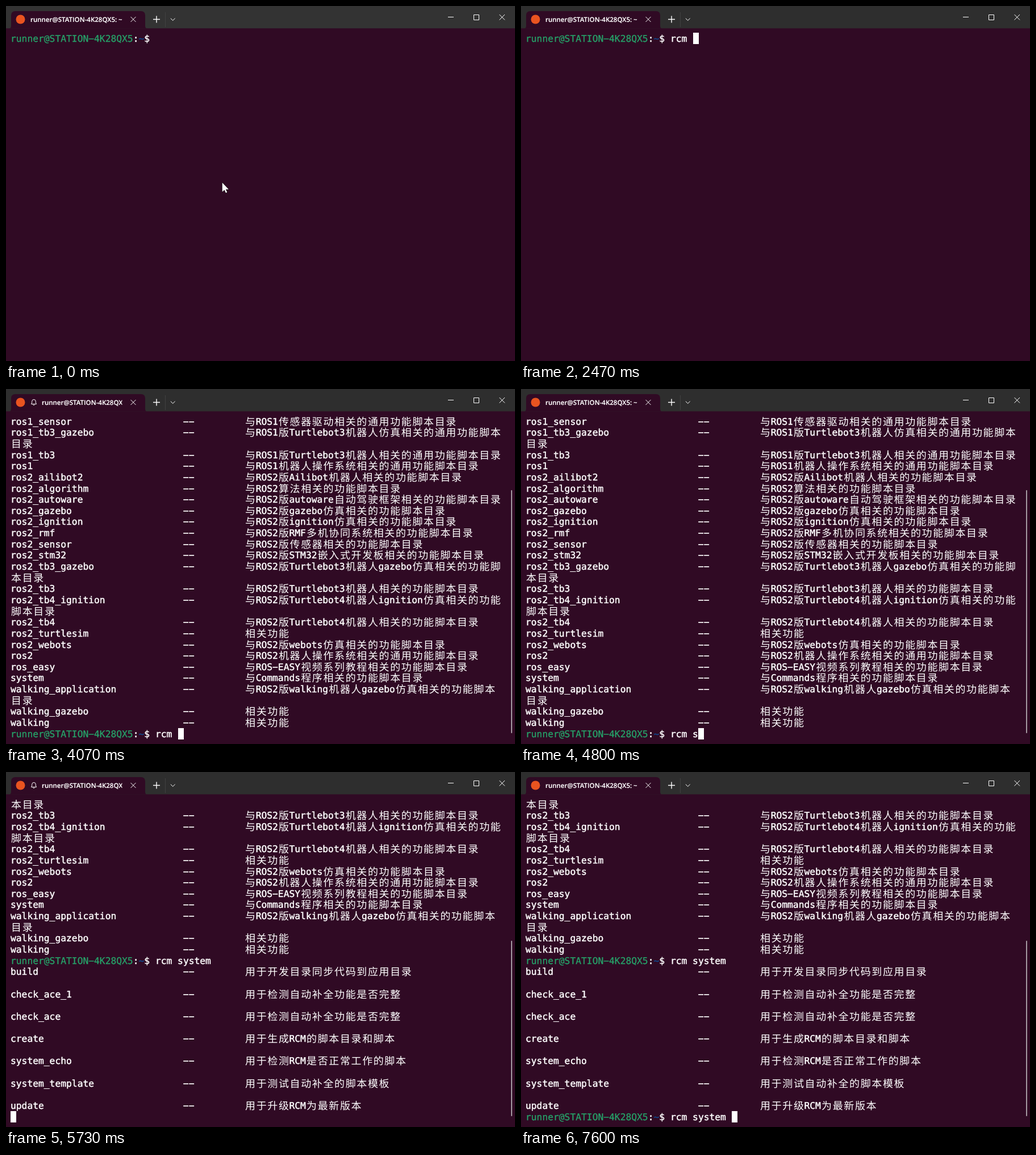
Recreate the animation shown at these times as an HTML page. Size 896x625 px, loop 8 s.

```html
<!DOCTYPE html>
<html lang="zh">
<head>
<meta charset="utf-8">
<title>Terminal</title>
<style>
  html, body { margin: 0; width: 100%; height: 100%; overflow: hidden; background: #300a24; }
  svg { display: block; width: 896px; height: 625px; }
  text { white-space: pre; text-rendering: geometricPrecision; }
  .mono { font: 16.3px "DejaVu Sans Mono", monospace; color: #fff; }
  .mono, .mono tspan { fill: currentColor; stroke: currentColor; stroke-width: .45px; }
  .mono .host { color: #26a269; stroke-width: .3px; }
  .mono .path { color: #12488b; }
  .cjk { font: 18px "Noto Sans CJK SC", "Noto Sans CJK", sans-serif; fill: #fff; }
  .title { font: 600 11.5px "Open Sans", "Noto Sans", sans-serif; fill: #fff; stroke: #fff; stroke-width: .2px; }
  .line { fill: none; stroke: #fff; stroke-width: 1; }
</style>
</head>
<body>
<svg viewBox="0 0 896 625">
  <clipPath id="tabClip"><rect x="40" y="10" width="164.5" height="28"/></clipPath>
  <rect width="896" height="625" fill="#300a24"/>
  <rect id="titleBar" width="896" height="39.3"/>
  <path fill="#300a24" d="M5 39.5Q9 39.5 9 35V16.5Q9 9 16.5 9H237.5Q245 9 245 16.5V35Q245 39.5 249 39.5Z"/>
  <circle cx="25.5" cy="23.5" r="8" fill="#e95420"/>
  <g id="bell" class="line">
    <path d="M44.5 26.5H53.5L52.3 24V21.8A3.3 3.3 0 0 0 45.7 21.8V24Z" stroke-linejoin="round"/>
    <path d="M47.5 27.5A1.6 1.6 0 0 0 50.5 27.5"/>
  </g>
  <g clip-path="url(#tabClip)"><text id="title" class="title" y="28"></text></g>
  <g class="line">
    <path d="M219.5 19L228.5 28M228.5 19L219.5 28"/>
    <path d="M259 23.5H271M265 17.5V29.5" stroke-width="1.4"/>
    <path d="M289.8 21.7L293.7 25.5L297.6 21.7"/>
    <path d="M778 19.5H788M823.5 15.5H832.5V24.5H823.5ZM868.5 15L878 24.5M878 15L868.5 24.5"/>
  </g>
  <path d="M280.5 11V37" stroke="#414141"/>
  <g id="screen"></g>
  <rect id="scrollbar" x="889" width="2" rx="1" fill="#a59aa2"/>
  <rect id="caret" width="10" height="20" fill="#fff"/>
  <path id="pointer" d="M0 0V16.2L3.8 12.7L6.2 18L8.6 17L6.2 11.7H11.2Z" fill="#fff" stroke="#000" paint-order="stroke"/>
</svg>
<script>
const LOOP = 8000, TICK = 1000 / 15;
const FOCUS = 470;
const LEFT = 8, TOP = 47.2, CELL_W = 9.81, CELL_H = 19.64, COLS = 88, LAST_ROW = 28;
const HOST = "runner@STATION-4K28QX5";
const PROMPT_COLS = HOST.length + 4;
const $ = id => document.getElementById(id);
const isWide = ch => ch >= "\u4e00" && ch <= "\u9fff";

const folders = `poker|用于测试目录
ros1_ailibot|与Ailibot机器人ROS1版相关的通用功能脚本目录
ros1_algorithm|与ROS1算法相关的通用功能脚本目录
ros1_gazebo|与ROS1 gazebo仿真相关的通用功能脚本目录
ros1_sensor|与ROS1传感器驱动相关的通用功能脚本目录
ros1_tb3_gazebo|与ROS1版Turtlebot3机器人仿真相关的通用功能脚本目录
ros1_tb3|与ROS1版Turtlebot3机器人相关的通用功能脚本目录
ros1|与ROS1机器人操作系统相关的通用功能脚本目录
ros2_ailibot2|与ROS2版Ailibot机器人相关的功能脚本目录
ros2_algorithm|与ROS2算法相关的功能脚本目录
ros2_autoware|与ROS2版autoware自动驾驶框架相关的功能脚本目录
ros2_gazebo|与ROS2版gazebo仿真相关的功能脚本目录
ros2_ignition|与ROS2版ignition仿真相关的功能脚本目录
ros2_rmf|与ROS2版RMF多机协同系统相关的功能脚本目录
ros2_sensor|与ROS2版传感器相关的功能脚本目录
ros2_stm32|与ROS2版STM32嵌入式开发板相关的功能脚本目录
ros2_tb3_gazebo|与ROS2版Turtlebot3机器人gazebo仿真相关的功能脚本目录
ros2_tb3|与ROS2版Turtlebot3机器人相关的功能脚本目录
ros2_tb4_ignition|与ROS2版Turtlebot4机器人ignition仿真相关的功能脚本目录
ros2_tb4|与ROS2版Turtlebot4机器人相关的功能脚本目录
ros2_turtlesim|相关功能
ros2_webots|与ROS2版webots仿真相关的功能脚本目录
ros2|与ROS2机器人操作系统相关的通用功能脚本目录
ros_easy|与ROS-EASY视频系列教程相关的功能脚本目录
system|与Commands程序相关的功能脚本目录
walking_application|与ROS2版walking机器人gazebo仿真相关的功能脚本目录
walking_gazebo|相关功能
walking|相关功能`;

const scripts = `build|用于开发目录同步代码到应用目录
check_ace_1|用于检测自动补全功能是否完整
check_ace|用于检测自动补全功能是否完整
create|用于生成RCM的脚本目录和脚本
system_echo|用于检测RCM是否正常工作的脚本
system_template|用于测试自动补全的脚本模板
update|用于升级RCM为最新版本`;

function wrap(line) {
  const rows = [""];
  let col = 0;
  for (const ch of line) {
    const width = isWide(ch) ? 2 : 1;
    if (col + width > COLS) { rows.push(""); col = 0; }
    rows[rows.length - 1] += ch;
    col += width;
  }
  return rows;
}

const toLines = list => list.split("\n").map(item => {
  const [name, about] = item.split("|");
  return (name.padEnd(31) + "--").padEnd(42) + about;
});

const prompt = typed => ({ typed });
const folderRows = toLines(folders).flatMap(wrap);
const scriptRows = toLines(scripts).join("\n\n").split("\n");
const history = [...folderRows, prompt("rcm system"), ...scriptRows];

const cellX = col => LEFT + col * CELL_W;
const rowY = row => TOP + row * CELL_H;
// A minus sign has the long bar that terminal fonts give the hyphen.
const dashes = text => text.replace(/-/g, "\u2212");

function drawRow(content, row) {
  const y = rowY(row) + 15.5;
  if (content.typed !== undefined) {
    return `<text class="mono" x="${LEFT}" y="${y}"><tspan class="host">${dashes(HOST)}</tspan>:` +
      `<tspan class="path">~</tspan>$ ${content.typed}</text>`;
  }
  let col = 0, out = "";
  for (const [run] of content.matchAll(/[\u4e00-\u9fff]+|[ -~]+/g)) {
    if (isWide(run[0])) {
      const xs = [...run].map((_, i) => (cellX(col + 2 * i) + 1.1).toFixed(2)).join(" ");
      out += `<text class="cjk" x="${xs}" y="${y + 1}">${run}</text>`;
      col += 2 * run.length;
    } else {
      out += `<text class="mono" x="${cellX(col)}" y="${y}">${dashes(run)}</text>`;
      col += run.length;
    }
  }
  return out;
}

const keys = [[2000, "r"], [2200, "c"], [2330, "m"], [2470, " "], [4730, "s"], [4930, "y"], [5200, "stem "]];
const typedAt = t => keys.filter(([at]) => t >= at).map(([, key]) => key).join("");

function screenAt(t) {
  const line = prompt(typedAt(t));
  const caretCol = PROMPT_COLS + line.typed.length;
  if (t < 2930) return { rows: [line], caretCol };
  if (t < 4070) return { rows: [...history.slice(0, 28), "--More--"], caretCol: 8, bar: 125 };
  if (t < 5730) return { rows: [...history.slice(4, 32), line], caretCol, bar: 178 };
  const rows = history.slice(-LAST_ROW);
  if (t < 5800) return { rows, caretCol: 0, caretRow: LAST_ROW, bar: 297 };
  return { rows: [...rows, line], caretCol, bar: 297 };
}

function pointerAt(t) {
  const tick = Math.floor((t + 4) / TICK);
  const p = Math.min(1, Math.max(0, (tick - 1) / 13));
  const e = p * p * (3 - 2 * p), q = 1 - e;
  const bend = (a, b, c) => q * q * a + 2 * q * e * b + e * e * c;
  return [bend(380.7, 350, 343.7), bend(311, 612, 345.8)];
}

const show = (node, on) => node.setAttribute("visibility", on ? "visible" : "hidden");
const place = (node, values) => Object.entries(values).forEach(([k, v]) => node.setAttribute(k, v));
let drawn = "";

function update(t) {
  const { rows, caretCol, caretRow = rows.length - 1, bar } = screenAt(t);
  const markup = rows.map(drawRow).join("");
  if (markup !== drawn) $("screen").innerHTML = drawn = markup;

  const focused = t >= FOCUS;
  $("titleBar").setAttribute("fill", focused ? "#2e2e2e" : "#333");
  place($("caret"), { x: Math.round(cellX(caretCol) + .3), y: Math.round(rowY(caretRow)) });
  show($("caret"), focused);
  show($("scrollbar"), bar);
  if (bar) place($("scrollbar"), { y: bar, height: 606 - bar });

  const ringing = (t >= 2800 && t < 4800) || (t >= 5530 && t < 7600);
  show($("bell"), ringing);
  $("title").setAttribute("x", ringing ? 63 : 43);

  show($("pointer"), t < 1930);
  $("pointer").setAttribute("transform", `translate(${pointerAt(t)})`);
}

$("title").textContent = HOST + ": ~";
const start = performance.now();
function frame() {
  update((performance.now() - start) % LOOP);
  requestAnimationFrame(frame);
}
frame();
</script>
</body>
</html>
```
